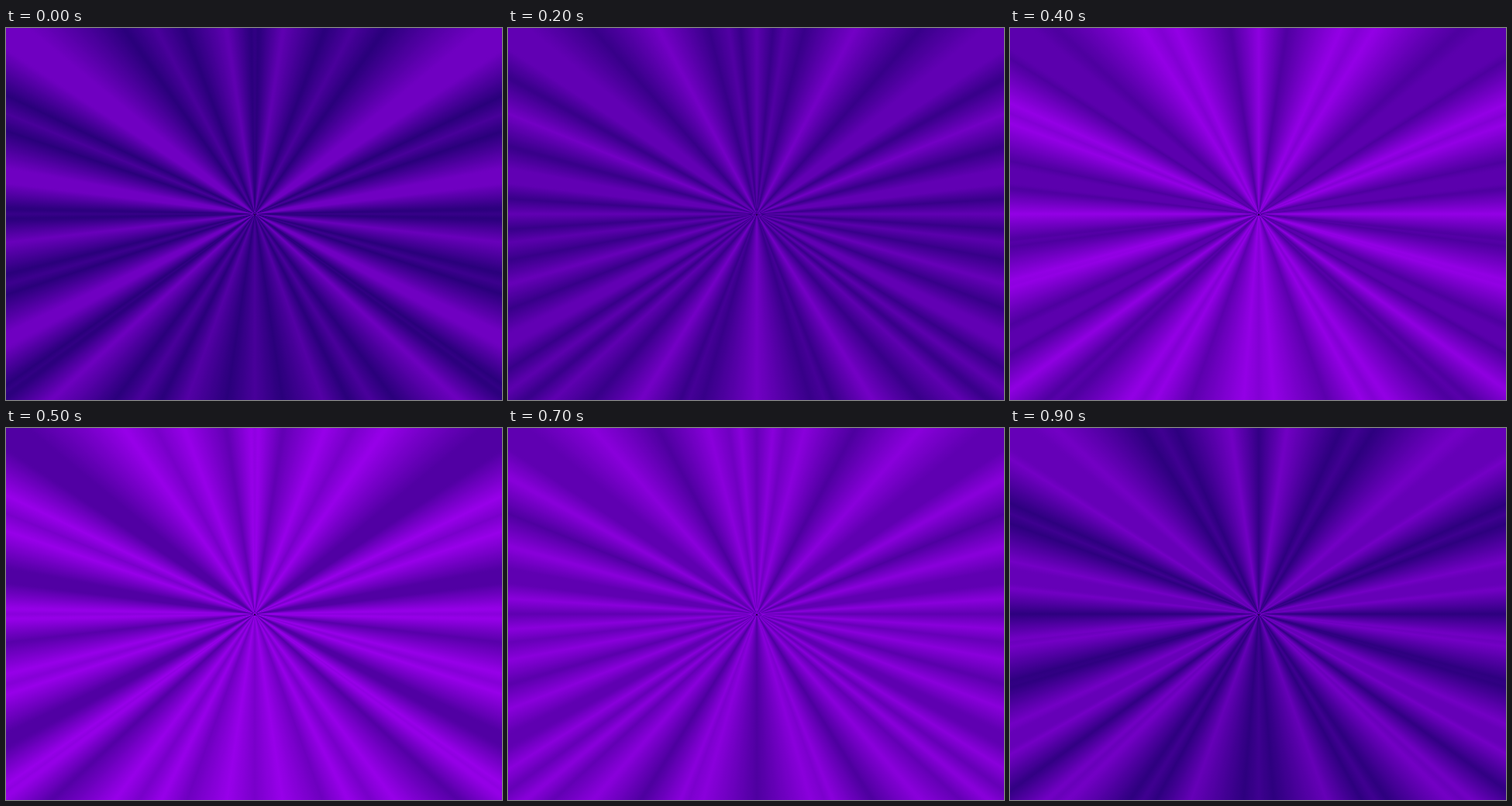
These frames come from a looping animation (640x480 px, 1000 ms). An HTML page with a canvas:

```html
<!DOCTYPE html>
<html>
<head>
<meta charset="utf-8">
<title>Purple rays</title>
<style>
html, body { margin: 0; width: 100%; height: 100%; overflow: hidden; background: #4b0096; }
canvas { display: block; }
</style>
</head>
<body>
<canvas id="stage" width="640" height="480"></canvas>
<script>
const ctx = document.getElementById('stage').getContext('2d');
const CX = 321, CY = 240, STEPS = 10;

// Light starts at each ray and spreads sideways:
// degrees from straight down, start in the cycle, delay per degree
const RAYS = [
  [0, .28, .026], [31.8, .27, .045], [54.6, .43, .08],
  [74.2, .36, .065], [90, .4, .085], [112, .28, .062],
  [152, .27, .032], [180, .44, .052]
];

// Moment of greatest brightness at an angle
const peakAt = deg =>
  Math.min(1, ...RAYS.map(([at, start, delay]) => start + delay * Math.abs(deg - at)));

// Triangle wave: 1 at whole numbers, -1 halfway between
const triangle = t => 4 * Math.abs(t - Math.floor(t) - .5) - 1;

function draw(t) {
  const fan = ctx.createConicGradient(Math.PI / 2, CX, CY);
  const base = 96 - 20 * Math.cos(2 * Math.PI * t);
  for (let deg = 0; deg <= 180; deg += .5) {
    const red = Math.round(base + 35 * triangle(t - peakAt(deg)));
    const color = `rgb(${red},0,${red + 82})`;
    fan.addColorStop(deg / 360, color);
    fan.addColorStop(1 - deg / 360, color);
  }
  ctx.fillStyle = fan;
  ctx.fillRect(0, 0, 640, 480);
  ctx.fillStyle = '#280050';
  ctx.fillRect(CX - 1, CY, 2, 2);
}

let shown = -1;
function tick() {
  const step = Math.floor(performance.now() / 1000 * STEPS) % STEPS;
  if (step !== shown) draw((shown = step) / STEPS);
  requestAnimationFrame(tick);
}
tick();
</script>
</body>
</html>
```
